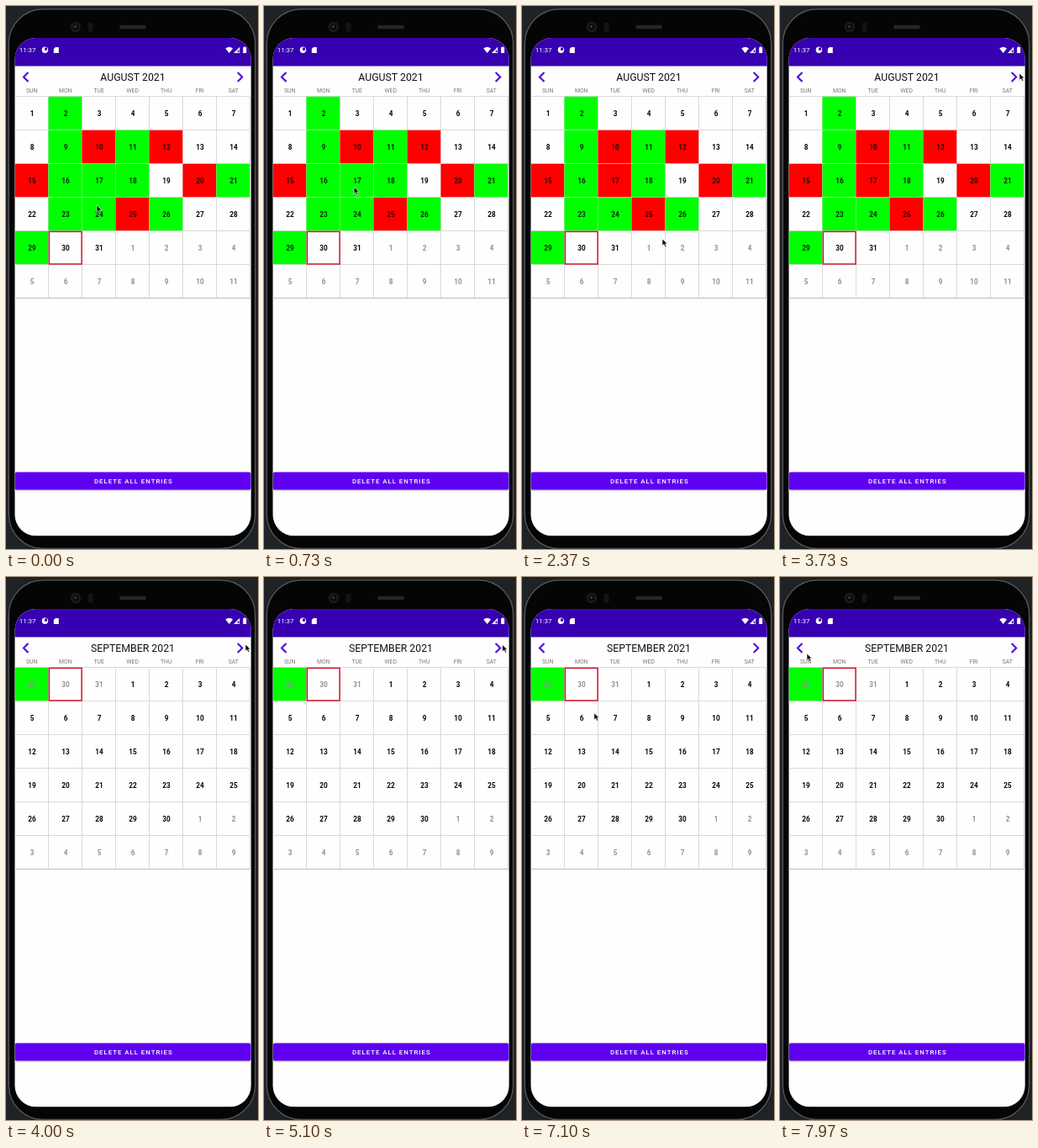
Animation of 300 by 646 pixels, one loop 8 s. Source, as an HTML page:

```html
<!DOCTYPE html>
<html lang="en">
<head>
<meta charset="utf-8">
<title>Calendar</title>
<style>
  html, body { margin: 0; width: 100%; height: 100%; overflow: hidden; background: #202326; }
  svg { display: block; width: 100%; height: 100%; font-family: Roboto, sans-serif; }
  .mid { text-anchor: middle; }
  .title { font-size: 12.3px; fill: #111; }
  .weekday { font-size: 6.8px; fill: #777; }
  .day { font-size: 8.2px; font-weight: 700; }
  .button { font-size: 7.8px; font-weight: 500; letter-spacing: 1px; fill: #fff; }
  .chevron { fill: none; stroke: #5710df; stroke-width: 2.2; }
</style>
</head>
<body>
<svg viewBox="0 0 300 646">
  <defs>
    <linearGradient id="shadow" x2="0" y2="1">
      <stop offset="0" stop-color="#aaa"/>
      <stop offset="1" stop-color="#fff"/>
    </linearGradient>
    <clipPath id="screen"><rect x="10.5" y="38" width="281.2" height="592.3" rx="25"/></clipPath>
  </defs>

  <!-- Phone -->
  <rect width="300" height="646" fill="#202326"/>
  <rect x="1.5" y="2" width="297" height="645.5" rx="43" fill="#101112"/>
  <rect x="3.2" y="3.7" width="293.6" height="642" rx="41" fill="#050506" stroke="#4b4e50" stroke-width="1.8"/>
  <circle cx="83" cy="25" r="6.3" fill="#17191b"/>
  <circle cx="83" cy="25" r="3.4" fill="#090a0d"/>
  <circle cx="82.5" cy="24.5" r="1.3" fill="#454951"/>
  <rect x="97.5" y="20" width="6" height="10.5" rx="1.5" fill="#131415"/>
  <rect x="135" y="22.8" width="32" height="4.4" rx="2.2" fill="#242628"/>

  <g clip-path="url(#screen)">
    <rect x="10" y="38" width="282" height="593" fill="#fefefe"/>
    <rect x="10" y="38" width="282" height="33.5" fill="#3700b0"/>

    <!-- Status bar -->
    <g fill="#fff">
      <text x="15.7" y="55.2" font-size="8">11:37</text>
      <circle cx="46.4" cy="52.3" r="3.7"/>
      <path d="M46 49.6h3v3.1h-3z" fill="#3700b0"/>
      <path d="M58.8 49h4v7h-6v-5z"/>
      <path d="M261.3 50.6q4.4-3.6 8.8 0l-4.4 5.4z"/>
      <path d="M278.2 48.8v7.2h-7.2z"/>
      <path d="M275.8 52.6h1.6v2.6h-1.6z" fill="#3700b0"/>
      <path d="M283.2 48.4h2v.9h1v6.8h-4v-6.8h1z"/>
    </g>

    <!-- Calendar header -->
    <path class="chevron" d="M26.5 79 21 84.5l5.5 5.5M275.7 79l5.5 5.5-5.5 5.5"/>
    <g id="weekdays" class="mid"></g>
    <g id="months"></g>

    <!-- Button -->
    <rect x="10.5" y="574" width="281.2" height="4" fill="url(#shadow)"/>
    <rect x="10.5" y="554.4" width="281.2" height="21.1" rx="2.5" fill="#5f00f0"/>
    <text class="button" x="105" y="567.9">DELETE ALL ENTRIES</text>
  </g>

  <path id="cursor" d="M0 0v8.2l1.9-1.7 1.5 3 1.5-.7-1.4-2.9h2.6z"
        fill="#080808" stroke="#fff" stroke-width=".8" stroke-opacity=".8"/>
</svg>
<script>
const LOOP = 8000, MARK_TIME = 900, TURN_TIME = 3870;
const CELL = 40, LEFT = 11, TOP = 108;
const GREEN = "#00ff00", RED = "#ff0000";
const greenDays = [2, 9, 11, 16, 17, 18, 21, 23, 24, 26, 29];
const redDays = [10, 12, 15, 20, 25];
const today = 30;

// Pointer stops: time, x, y
const stops = [
  [0, 108, 237], [400, 108, 237], [830, 107, 212], [1650, 107, 212],
  [2300, 167, 277], [2500, 167, 277], [3250, 290, 81], [3600, 285, 80],
  [5050, 285, 80], [6150, 92, 174], [6750, 92, 174], [7200, 85, 160],
  [7500, 85, 160], [7940, 32, 91], [8000, 32, 91]
];

const byId = id => document.getElementById(id);

function add(parent, tag, attrs, text = "") {
  const node = document.createElementNS("http://www.w3.org/2000/svg", tag);
  for (const key in attrs) node.setAttribute(key, attrs[key]);
  node.textContent = text;
  return parent.appendChild(node);
}

function drawGrid(group) {
  let grid = "";
  for (let i = 0; i < 7; i++) {
    grid += `M${LEFT - .5} ${TOP - .5 + i * CELL}h281.2`;
    grid += `M${LEFT + 39.5 + i * CELL} ${TOP - .5}v240`;
  }
  add(group, "path", { d: grid, fill: "none", stroke: "#d9d9d9" });
  add(group, "path", { d: `M${LEFT - .5} ${TOP + 239.5}h281.2`, stroke: "#bdbdbd" });
}

// Days are counted from 1 August 2021, so 32 is 1 September.
function buildMonth(title, firstDay, month) {
  const group = add(byId("months"), "g", { class: "mid" });
  let marked;
  add(group, "text", { class: "title", x: 151, y: 89.3 }, title);
  drawGrid(group);
  for (let i = 0; i < 42; i++) {
    const day = firstDay + i, date = new Date(2021, 7, day);
    const x = LEFT + i % 7 * CELL, y = TOP + Math.floor(i / 7) * CELL;
    const color = greenDays.includes(day) ? GREEN : redDays.includes(day) ? RED : null;
    if (color) {
      const box = add(group, "rect", { x: x - .5, y: y - .2, width: 39.7, height: 39.4, fill: color });
      if (day === 17) marked = box;
    }
    if (day === today) {
      add(group, "rect", {
        x: x + .4, y: y + .4, width: 38.7, height: 38.6,
        fill: "none", stroke: "#cc1630", "stroke-width": 1.5
      });
    }
    add(group, "text", {
      class: "day", x: x + 20, y: y + 22.9,
      fill: date.getMonth() === month ? "#080808" : "#929292",
      opacity: color ? .85 : 1
    }, date.getDate());
  }
  return { group, marked };
}

"SUN MON TUE WED THU FRI SAT".split(" ").forEach((name, i) =>
  add(byId("weekdays"), "text", { class: "weekday", x: LEFT + 19.7 + i * CELL, y: 102.6 }, name));

const august = buildMonth("AUGUST 2021", 1, 7);
const september = buildMonth("SEPTEMBER 2021", 29, 8);

function pointerAt(t) {
  const next = Math.max(1, stops.findIndex(stop => stop[0] > t));
  const [t0, x0, y0] = stops[next - 1], [t1, x1, y1] = stops[next];
  const p = (t - t0) / (t1 - t0), eased = p * p * (3 - 2 * p);
  return [x0 + (x1 - x0) * eased, y0 + (y1 - y0) * eased];
}

function draw(now) {
  const t = now % LOOP, turned = t >= TURN_TIME;
  august.group.style.display = turned ? "none" : "";
  september.group.style.display = turned ? "" : "none";
  august.marked.setAttribute("fill", t < MARK_TIME ? GREEN : RED);
  byId("cursor").setAttribute("transform", `translate(${pointerAt(t)})`);
}

const start = performance.now();
function tick() {
  draw(performance.now() - start);
  requestAnimationFrame(tick);
}
tick();
</script>
</body>
</html>
```
